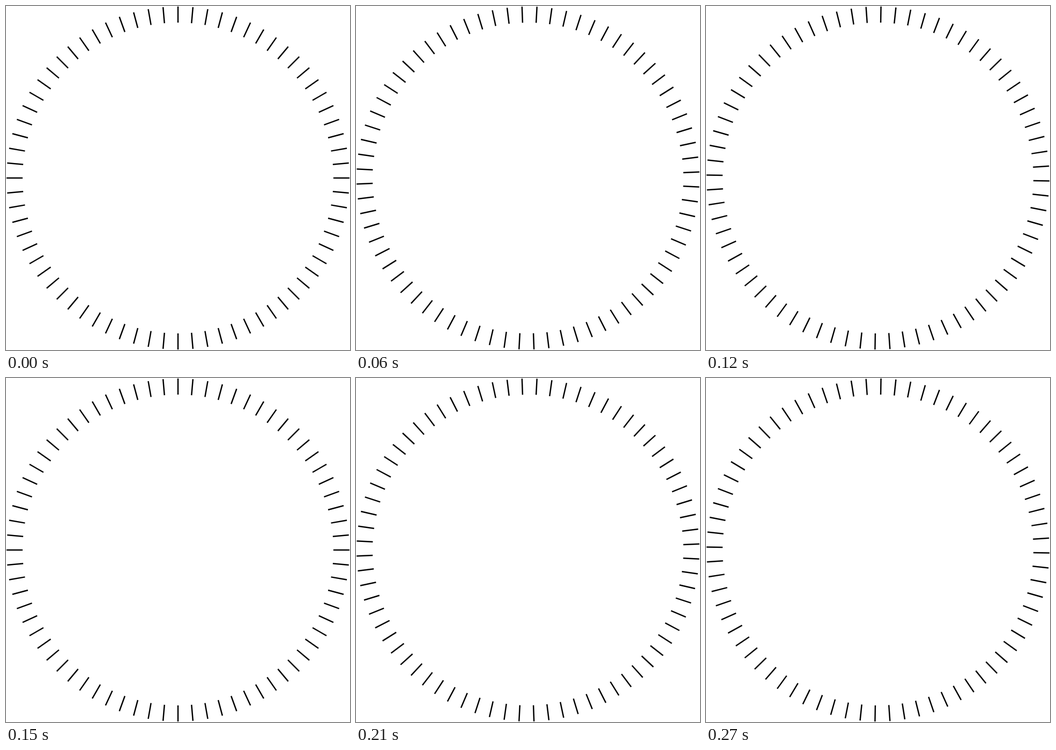
These frames come from a looping animation (642x642 px, 300 ms). An HTML page with a canvas:

```html
<!DOCTYPE html>
<html>
<head>
<meta charset="utf-8">
<style>
  html, body { margin: 0; width: 100%; height: 100%; overflow: hidden; background: #fff; }
  canvas { display: block; }
</style>
</head>
<body>
<canvas id="dial" width="642" height="642"></canvas>
<script>
const ctx = document.getElementById('dial').getContext('2d');
const CENTER = 321, INNER = 290, OUTER = 320, TICKS = 72;
const STEP_MS = 30, LOOP_STEPS = 10;
const start = performance.now();

function draw(ms) {
  const step = Math.floor(ms / STEP_MS) % LOOP_STEPS;
  ctx.clearRect(0, 0, 642, 642);
  ctx.lineWidth = 2.5;
  ctx.beginPath();
  for (let i = 0; i < TICKS; i++) {
    // The ring turns one degree counterclockwise per step.
    const angle = (i * 360 / TICKS - step) * Math.PI / 180;
    const x = Math.cos(angle), y = Math.sin(angle);
    ctx.moveTo(CENTER + INNER * x, CENTER + INNER * y);
    ctx.lineTo(CENTER + OUTER * x, CENTER + OUTER * y);
  }
  ctx.stroke();
}

function tick() {
  draw(performance.now() - start);
  requestAnimationFrame(tick);
}
tick();
</script>
</body>
</html>
```
